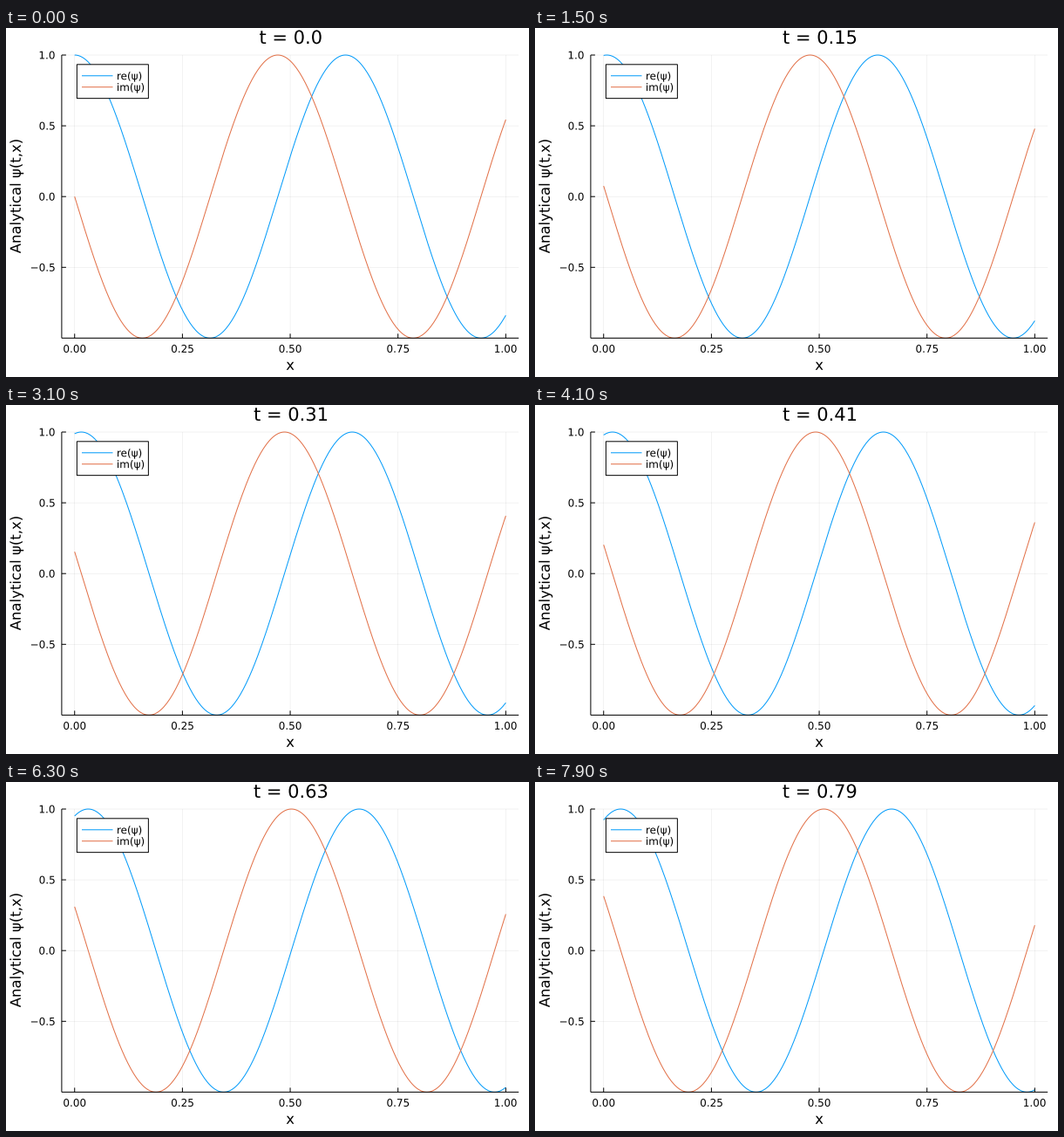
A matplotlib script that plays this animation: 600 by 400 pixels, repeating every 8000 ms.

```python
import numpy as np
import matplotlib.pyplot as plt
from matplotlib.animation import FuncAnimation
from matplotlib.patches import PathPatch, Rectangle
from matplotlib.textpath import TextPath
from matplotlib.transforms import Affine2D

W, H, DPI = 600, 400, 100
FRAMES, INTERVAL, DT = 80, 100, 0.01
K, OMEGA = 10, 0.5
BLUE, ORANGE = "#009AFA", "#E26F46"

# Plot area in pixels; x spans 0..1 with a 3% margin, y spans -1..1
LEFT, RIGHT, TOP, BOTTOM = 63.9, 588.2, 31.0, 355.4
MID_X, MID_Y = (LEFT + RIGHT) / 2, (TOP + BOTTOM) / 2

plt.rcParams["font.family"] = "DejaVu Sans"


def pt(px):
    return px * 72 / DPI


def to_x(x):
    return MID_X + (x - 0.5) * (RIGHT - LEFT) / 1.06


def to_y(y):
    return MID_Y - y * (BOTTOM - TOP) / 2


def line(xs, ys, color="black", width=1.0, **kw):
    return ax.plot(xs, ys, color=color, lw=pt(width), snap=False,
                   solid_capstyle="butt", **kw)[0]


def glyphs(x, y, text, size, align=0.5, angle=0):
    """Outline of text with its baseline at y, aligned on x by its ink."""
    path = TextPath((0, 0), text, size=size)
    box = path.get_extents()
    shift = -(box.x0 + align * box.width)
    move = (Affine2D().translate(shift, 0).scale(1, -1)
            .rotate_deg(-angle).translate(x, y))
    return move.transform_path(path)


def label(*args, **kw):
    patch = PathPatch(glyphs(*args, **kw), fc="black", lw=0, snap=False,
                      zorder=7)
    return ax.add_patch(patch)


fig = plt.figure(figsize=(W / DPI, H / DPI), dpi=DPI, facecolor="white")
ax = fig.add_axes([0, 0, 1, 1])
ax.set_xlim(0, W)
ax.set_ylim(H, 0)
ax.axis("off")

# Grid, ticks and tick labels
for v in (0, 0.25, 0.5, 0.75, 1):
    x = to_x(v)
    line([x, x], [TOP, BOTTOM], width=0.5, alpha=0.1, zorder=1)
    line([x, x], [BOTTOM, BOTTOM - 5], zorder=4)
    label(x, 371.9, f"{v:.2f}", 12)
for v in (-0.5, 0, 0.5, 1):
    y = to_y(v)
    line([LEFT, RIGHT], [y, y], width=0.5, alpha=0.1, zorder=1)
    line([LEFT, LEFT + 5], [y, y], zorder=4)
    label(55.7, y + 4.4, f"{v:.1f}".replace("-", "\u2212"), 12, align=1)

line([LEFT, LEFT], [TOP, BOTTOM], zorder=4)
line([LEFT, RIGHT], [BOTTOM, BOTTOM], zorder=4)

label(MID_X, 391.8, "x", 16.5)
label(16.8, MID_Y, "Analytical ψ(t,x)", 16.5, angle=90)
title = label(MID_X + 0.3, 18, "t = 0.0", 21)

# Curves
xs = np.linspace(0, 1, 300)
re_line = line(to_x(xs), to_y(0 * xs), BLUE, zorder=3)
im_line = line(to_x(xs), to_y(0 * xs), ORANGE, zorder=3)

# Legend
ROW = 12.95
box_x, box_y = LEFT + (RIGHT - LEFT) / 30, TOP + (BOTTOM - TOP) / 30
ax.add_patch(Rectangle((box_x, box_y), 82, 3 * ROW, fc="white", ec="black",
                       lw=pt(1), snap=False, zorder=5))
for row, name, color in ((1, "re(ψ)", BLUE), (2, "im(ψ)", ORANGE)):
    y = box_y + row * ROW
    line([87, 122.5], [y, y], color, zorder=6)
    label(128, y + 4.4, name, 12, align=0)


def update(i):
    t = round(i * DT, 2)
    phase = K * xs - OMEGA * t
    re_line.set_ydata(to_y(np.cos(phase)))
    im_line.set_ydata(to_y(-np.sin(phase)))
    title.set_path(glyphs(MID_X + 0.3, 18, f"t = {t}", 21))
    return re_line, im_line, title


anim = FuncAnimation(fig, update, frames=FRAMES, interval=INTERVAL,
                     repeat=True, repeat_delay=0)
plt.show()
```
